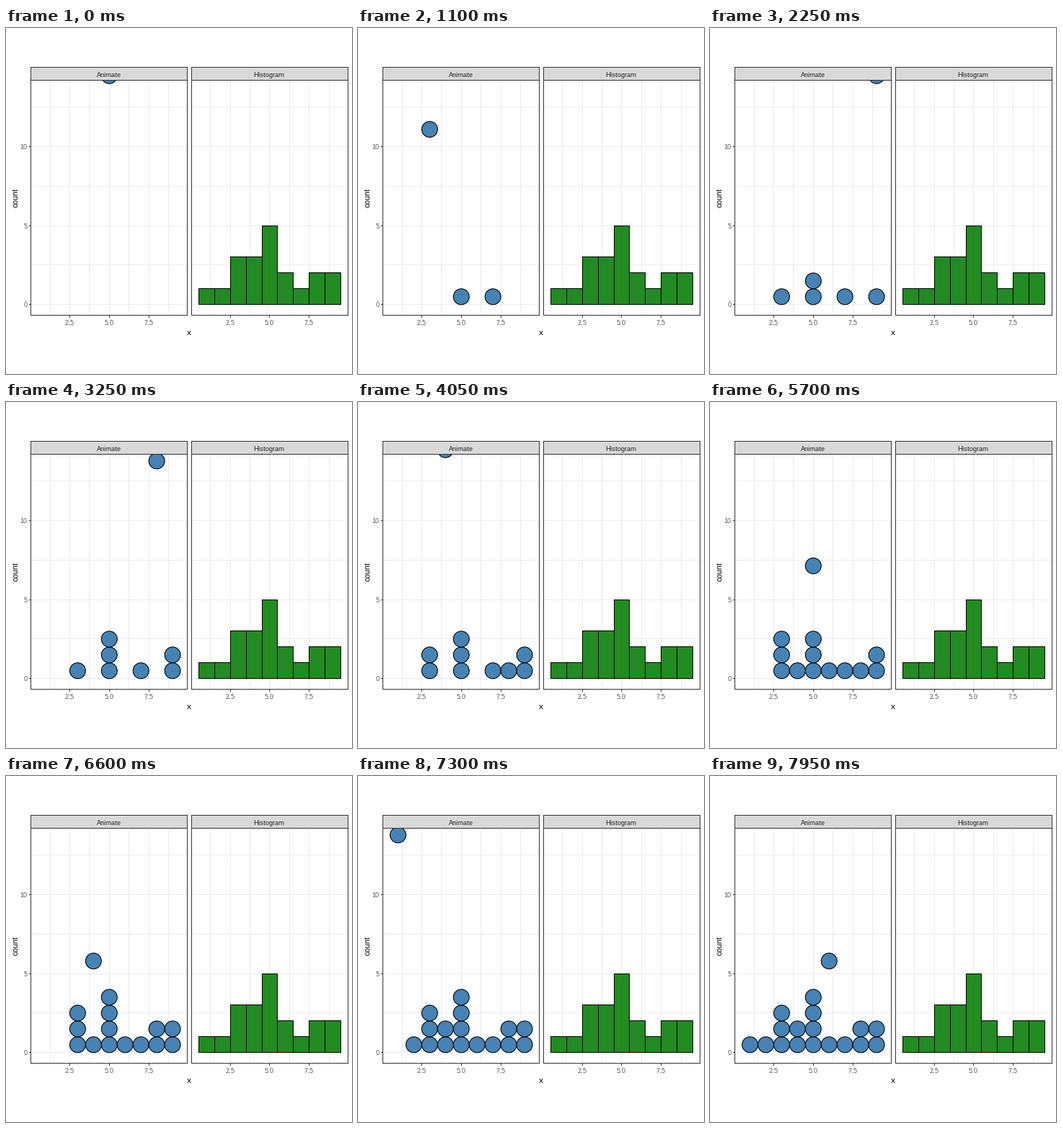
Animation, 480 px wide and 480 px high, one loop 8000 ms. Source, as a matplotlib script:

```python
import math

import matplotlib.pyplot as plt
from matplotlib.animation import FuncAnimation
from matplotlib.patches import Circle, Rectangle

SIZE, DPI = 480, 72
FRAMES, INTERVAL = 160, 50
FRAMES_PER_BALL, FALL_STEPS = 9, 8
UNIT = 21.94            # pixels per data unit on both axes
BASE_Y = 383.75         # pixel height of count = 0
START_Y = 14.5          # height the balls are dropped from
X_MIN, X_MAX = 0.05, 9.95
STRIP_TOP, TOP, BOTTOM = 54, 72, 398
ORIGINS = {"Animate": 34.69, "Histogram": 257.39}
DROPS = [5, 7, 3, 5, 9, 9, 5, 8, 3, 4, 3, 6, 5, 8, 4, 2, 1, 6]
COUNTS = [1, 1, 3, 3, 5, 2, 1, 2, 2]

# Whole-pixel glyph hinting keeps the small labels sharp.
plt.rcParams.update({"font.family": "Liberation Sans",
                     "text.hinting": "native", "text.hinting_factor": 1})


def px(x, origin):
    return origin + (x - X_MIN) * UNIT


def py(y):
    return BASE_Y - y * UNIT


def pixel_x(x, origin):
    return math.floor(px(x, origin))


def pixel_y(y):
    return math.floor(py(y))


fig = plt.figure(figsize=(SIZE / DPI, SIZE / DPI), dpi=DPI, facecolor="white")
ax = fig.add_axes([0, 0, 1, 1])
ax.set(xlim=(0, SIZE), ylim=(SIZE, 0))
ax.axis("off")


def line(x0, y0, x1, y1, color):
    ax.plot([x0, x1], [y0, y1], color=color, lw=1, zorder=1,
            antialiased=False, solid_capstyle="butt")


def box(x0, y0, x1, y1, fill, edge, z):
    ax.add_patch(Rectangle((x0, y0), x1 - x0, y1 - y0, facecolor=fill,
                           edgecolor=edge, lw=1, zorder=z, antialiased=False))


def label(x, y, text, size=9, color="#4D4D4D", ha="center", **kw):
    ax.text(x, y, text, fontsize=size, color=color, ha=ha, va="baseline", **kw)


def draw_panel(title, origin):
    left, right = pixel_x(X_MIN, origin), pixel_x(X_MAX, origin)
    for i in range(1, 8):
        x = pixel_x(1.25 * i, origin)
        line(x, TOP, x, BOTTOM, "#EBEBEB")
        if i % 2 == 0:
            line(x, BOTTOM, x, BOTTOM + 3, "#333333")
            label(x, 412, f"{1.25 * i:.1f}")
    for i in range(6):
        y = pixel_y(2.5 * i)
        line(left, y, right, y, "#EBEBEB")
    box(left, TOP, right, BOTTOM, "none", "#333333", 5)
    box(left, STRIP_TOP, right, TOP, "#D9D9D9", "#333333", 5)
    label(pixel_x(5, origin), 68, title, color="#1A1A1A", zorder=6)


for title, origin in ORIGINS.items():
    draw_panel(title, origin)

for count in (0, 5, 10):
    y = pixel_y(count)
    line(32, y, 34, y, "#333333")
    label(29.5, y + 4, str(count), ha="right")
label(254, 426, "x", 11, "black")
label(16, 235.65, "count", 11, "black", rotation=90, rotation_mode="anchor")

for i, count in enumerate(COUNTS):
    left, right = (pixel_x(i + e, ORIGINS["Histogram"]) for e in (0.5, 1.5))
    box(left, pixel_y(count), right, pixel_y(0), "#228B22", "black", 3)

window = Rectangle((35, TOP + 1), 216, BOTTOM - TOP - 1,
                   transform=ax.transData)
balls = []
for i, x in enumerate(DROPS):
    ball = Circle((px(x, ORIGINS["Animate"]), 0), UNIT / 2,
                  facecolor="#4682B4", edgecolor="black", lw=1.07, zorder=3)
    ax.add_patch(ball)
    ball.set_clip_path(window)
    balls.append((ball, DROPS[:i].count(x) + 0.5))


def update(frame):
    current, step = divmod(frame, FRAMES_PER_BALL)
    for i, (ball, rest) in enumerate(balls):
        t = min((step + 1) / FALL_STEPS, 1) if i == current else 1
        height = START_Y + (rest - START_Y) * t ** 3
        ball.center = (ball.center[0], py(height))
        ball.set_visible(i <= current)
    return [ball for ball, _ in balls]


anim = FuncAnimation(fig, update, frames=FRAMES, interval=INTERVAL,
                     repeat=True, repeat_delay=0, blit=False)
plt.show()
```
